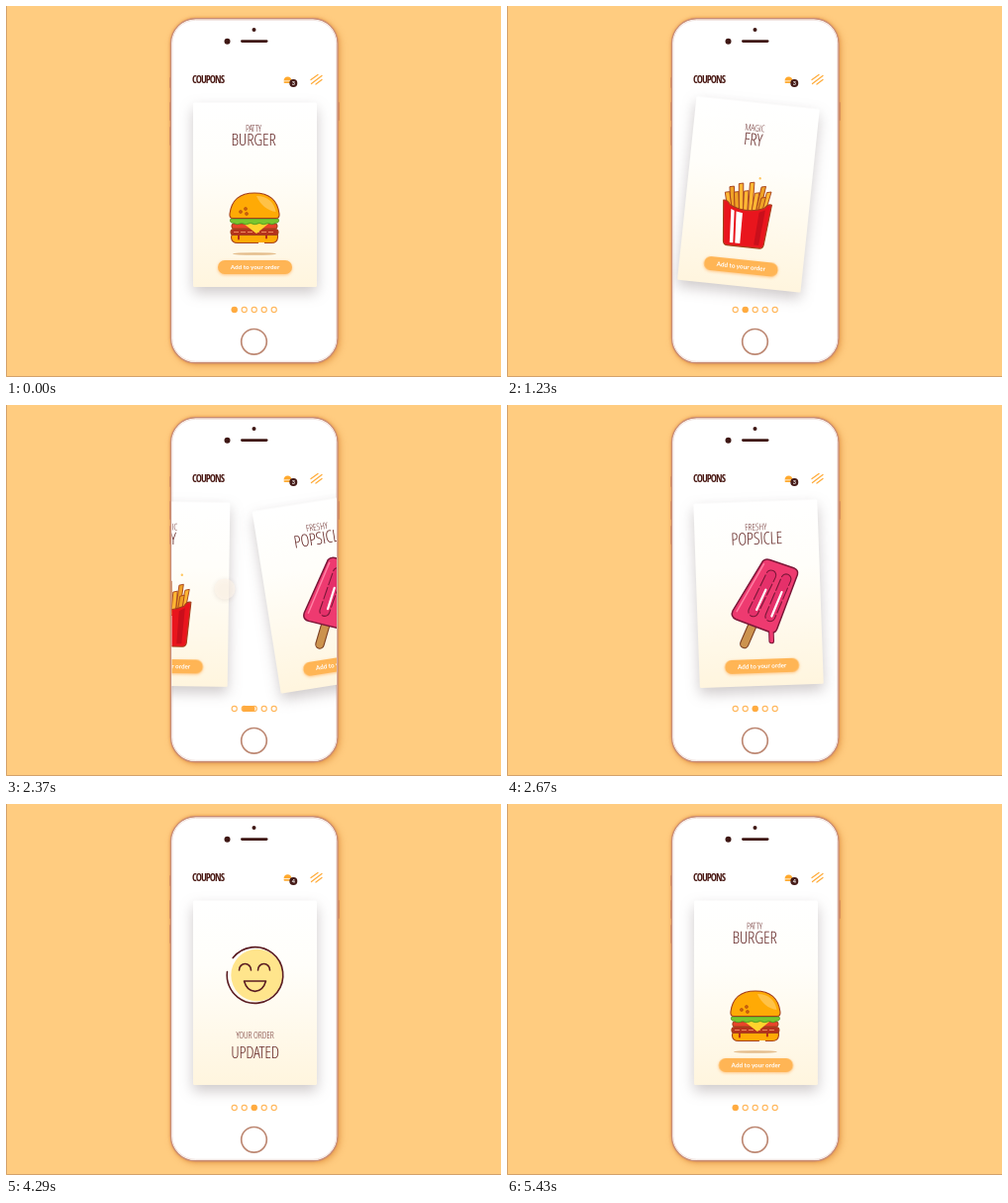
An HTML page for the animation above (5460 ms loop, 500 px wide and 375 px high).

```html
<!DOCTYPE html>
<html lang="en">
<head>
<meta charset="utf-8">
<title>Coupons</title>
<style>
  html, body { margin: 0; width: 100%; height: 100%; overflow: hidden; background: #ffcc80; }
  svg { display: block; width: 500px; height: 375px; }
  text { text-anchor: middle; font-family: "Open Sans Condensed Light", "Roboto Condensed", "Open Sans Condensed", "Liberation Sans Narrow", sans-serif; font-stretch: condensed; }
  .kicker { font-size: 9.4px; font-weight: 300; letter-spacing: -.1px; fill: #6d3030; }
  .name { font-size: 17.2px; font-weight: 300; letter-spacing: -.2px; fill: #652827; }
  .head { font: 700 10.4px "Open Sans Condensed", "Roboto Condensed", sans-serif; letter-spacing: -.95px; fill: #4a1914; text-anchor: start; }
  .label { font: 700 6.3px Lato, sans-serif; fill: #fff; }
  .count { font: 700 5.5px Lato, sans-serif; fill: #fff; }
  .phone { filter: drop-shadow(0 0 1.5px rgba(215, 120, 50, .6)) drop-shadow(2px 2px 3px rgba(205, 115, 30, .4)); }
  .paper { filter: drop-shadow(0 6px 7px rgba(80, 60, 65, .28)); }
  .pill { filter: drop-shadow(0 1.5px 1.5px rgba(255, 150, 40, .5)); }
  .touch { filter: drop-shadow(0 1px 2px rgba(130, 90, 70, .25)); }
  .ink { stroke: #a5401a; stroke-width: 1.1; stroke-linejoin: round; stroke-linecap: round; }
  .line { fill: none; stroke: #5b1d22; stroke-width: 1.6; stroke-linecap: round; stroke-linejoin: round; }
</style>
</head>
<body>
<svg viewBox="0 0 500 375">
  <defs>
    <linearGradient id="cream" x1="0" y1="0" x2="0" y2="1">
      <stop offset="0" stop-color="#fff"/>
      <stop offset=".35" stop-color="#fffefa"/>
      <stop offset="1" stop-color="#fff5de"/>
    </linearGradient>
    <clipPath id="screen"><rect x="167.500" y="60" width="166.500" height="260"/></clipPath>
    <g id="paper"><rect class="paper" x="189" y="97.500" width="125" height="186.500" rx="1.500" fill="url(#cream)"/></g>
    <g id="button">
      <rect class="pill" x="-37.500" y="-7" width="75" height="14" rx="7" fill="#ffb555"/>
      <text class="label" y="2.200">Add to your order</text>
    </g>
  </defs>

  <rect width="500" height="375" fill="#ffcc80"/>
  <path d="M.5 0V374.500H500" fill="none" stroke="#d3a26c"/>

  <g fill="#dda27c">
    <rect x="165" y="72" width="2" height="11" rx="1"/>
    <rect x="165" y="97" width="2" height="19" rx="1"/>
    <rect x="165" y="122" width="2" height="19" rx="1"/>
    <rect x="335" y="97" width="2" height="19" rx="1"/>
  </g>
  <rect class="phone" x="166.500" y="12.800" width="168.500" height="348" rx="25" fill="#fff" stroke="#c98d76" stroke-width="1.400"/>
  <rect x="168" y="14.300" width="165.500" height="345" rx="23.500" fill="none" stroke="#f1e3df"/>
  <g fill="#3f1815">
    <circle cx="250.500" cy="24" r="2"/>
    <circle cx="223.500" cy="35.700" r="3"/>
    <rect x="237" y="34.200" width="27.500" height="2.800" rx="1.400"/>
  </g>
  <circle cx="250.500" cy="339.300" r="12.800" fill="#fff" stroke="#bd8873" stroke-width="1.700"/>

  <text class="head" x="188" y="78">COUPONS</text>
  <g id="bag" fill="#ffa92e">
    <path d="M280.500 75.500Q281 71.500 284.500 71.500T288.500 75.500Z"/>
    <rect x="280.500" y="76.300" width="8" height="1.600" rx=".8"/>
  </g>
  <circle cx="290.300" cy="78" r="4" fill="#451b18"/>
  <text class="count" id="count" x="290.300" y="80"></text>
  <path d="M308 74.500L315 69.500M308.500 78.500L319 70.500M313 79L319 74.500" fill="none" stroke="#ffad3d" stroke-width="1.300" stroke-linecap="round"/>

  <g clip-path="url(#screen)">
    <g id="burger">
      <use href="#paper"/>
      <text class="kicker" x="250" y="126.500">PATTY</text>
      <text class="name" x="250" y="141">BURGER</text>
      <ellipse id="shade" cx="251" cy="250.500" rx="22" ry="1.300" fill="#e4bd8c"/>
      <g id="bun">
        <path class="ink" d="M228 231.500H274.500V234Q274 239.500 268 239.500H234Q228 239.500 227.500 234Z" fill="#ffaa05"/>
        <rect class="ink" x="228" y="220" width="46" height="5" rx="2.500" fill="#e8452a"/>
        <rect class="ink" x="227" y="225.500" width="48" height="6" rx="3" fill="#b5321d"/>
        <path d="M230 228.500H272" stroke="#f08a5c" stroke-dasharray="5 2"/>
        <path d="M238 218.500H267L253 230Z" fill="#ffd42d"/>
        <path d="M227 215H275Q277 219 272 219.500Q269 222 265 219.500Q260 222 256 219.500Q251 222 247 219.500Q242 222 238 219.500Q233 222 230 219.500Q225 219 227 215Z" fill="#79c62f" stroke="#3f8a1b" stroke-width=".7"/>
        <path class="ink" d="M229 214.500Q225.500 214.500 226 210C228 195 238 189 251 189S274 195 276 210Q276.500 214.500 273 214.500Z" fill="#ffaa05"/>
        <path d="M253 192C265 192 271 199 272.500 208C264 207 257 201 253 192Z" fill="#ffc247"/>
        <g fill="none" stroke="#a83a10" stroke-width="1.100"><circle cx="237" cy="208" r="1.200"/><circle cx="242" cy="205" r="1.200"/><circle cx="243" cy="210" r="1.200"/></g>
        <path d="M235 232V235.500M263 232V234.500" stroke="#b52c1b" stroke-width="2" stroke-linecap="round"/>
        <path d="M255 239.800H261" stroke="#fff4da" stroke-width="1.800"/>
      </g>
      <use href="#button" transform="translate(251.500 264)"/>
    </g>

    <g id="fries">
      <use href="#paper"/>
      <text class="kicker" x="251" y="126.500">MAGIC</text>
      <text class="name" x="250.500" y="141">FRY</text>
      <g id="sticks" class="ink" fill="#ffb734"></g>
      <path class="ink" d="M227 199Q231 198 234 203Q251 211 269 203Q272 198 276 199L272 240Q271.500 244 268 244H235Q231.500 244 231 240Z" fill="#e9151d"/>
      <path d="M235.500 207L239 208.500L241 241H237.500ZM241 209L247.500 210L248 241H243Z" fill="#fff"/>
      <path d="M264 208L270 205L267 241H262Z" fill="#c90f1b"/>
      <circle id="spark" cx="266.500" cy="171.500" r="1.200" fill="#ffc65e"/>
      <use href="#button" transform="translate(251.500 264)"/>
    </g>

    <g id="sweet">
      <use href="#paper"/>
      <g id="pop">
        <text class="kicker" x="251" y="126.500">FRESHY</text>
        <text class="name" x="251.500" y="141">POPSICLE</text>
        <path d="M244.500 222L235.500 241" stroke="#7b4024" stroke-width="9.500" stroke-linecap="round"/>
        <path d="M244.500 222L235.500 241" stroke="#cc934e" stroke-width="7.300" stroke-linecap="round"/>
        <path d="M263 226V239" stroke="#7b1738" stroke-width="5.600" stroke-linecap="round"/>
        <path d="M257 158Q260 155.500 264 157L288 166Q293 168.500 291.500 173L269 227Q267 232 261.500 230L228 216Q222 213 225 207Z" fill="#ee3a70" stroke="#7b1738" stroke-width="1.500" stroke-linejoin="round"/>
        <path d="M263 226V239" stroke="#ee3a70" stroke-width="3.600" stroke-linecap="round"/>
        <path d="M258 161L229 208" stroke="#ff7fa3" stroke-width="1.500" stroke-linecap="round"/>
        <g fill="#e5306a" stroke="#7b1738" stroke-width="1.100" stroke-dasharray="13 2">
          <rect x="-5" y="-26" width="10" height="51" rx="5" transform="translate(255 191) rotate(28)"/>
          <rect x="-5" y="-26" width="10" height="51" rx="5" transform="translate(271 196) rotate(25)"/>
        </g>
        <path d="M259 187L249 207M275 190L264 214" stroke="#fff" stroke-width="2.200" stroke-linecap="round"/>
        <g id="press"><use href="#button"/></g>
      </g>
      <g id="done">
        <text class="kicker" x="251.500" y="237">YOUR ORDER</text>
        <text class="name" x="251.500" y="256.500">UPDATED</text>
        <g id="face">
          <circle cx="2" r="26.200" fill="#ffe58c"/>
          <circle id="ring" class="line" r="28.300" pathLength="100" transform="rotate(-142)"/>
          <path class="line" d="M-16 -5A6 6.500 0 0 1 -4 -5M3 -5A6 6.500 0 0 1 15 -5"/>
          <path id="mouth" class="line" d="M-11 6H11Q8 15.500 0 15.500T-11 6Z"/>
        </g>
      </g>
    </g>
  </g>

  <g id="dots" fill="none" stroke="#ffb75c" stroke-width="1.100"></g>
  <rect id="active" y="304" height="6" rx="3" fill="#ffab40"/>
  <circle id="touch" class="touch" r="10.500" fill="#fdf2e6" fill-opacity=".8"/>
</svg>

<script>
const LOOP = 5460;
const $ = id => document.getElementById(id);
const set = (id, attr, value) => $(id).setAttribute(attr, value);
const ramp = (t, a, b) => Math.min(1, Math.max(0, (t - a) / (b - a)));
const smooth = p => p * p * (3 - 2 * p);
const out = p => 1 - (1 - p) ** 2;

// Eased value through [time, value] steps
function key(t, steps) {
  let [t0, v0] = steps[0];
  for (const [t1, v1] of steps) {
    if (t < t1) return v0 + (v1 - v0) * smooth(ramp(t, t0, t1));
    [t0, v0] = [t1, v1];
  }
  return v0;
}

// Each swipe: dir of travel, pace of its own clock, dots it joins
const swipes = [
  { start: 560, pace: 1.3, dir: -1, from: "burger", to: "fries", dots: [0, 1] },
  { start: 2010, pace: 1, dir: -1, from: "fries", to: "sweet", dots: [1, 2] },
  { start: 4730, pace: .85, dir: 1, from: "sweet", to: "burger", dots: [2, 0] }
];
const SWING = [[120, 0], [300, 11], [360, 9], [500, -6.2], [660, 2], [840, 0]];
const LEAN = [[320, 0], [460, 4]];
const travel = u => u < 330 ? 43 * ramp(u, 130, 330) ** 2 : 43 + 107 * out(ramp(u, 330, 460));
const dotX = i => 230.7 + 10 * i;

function place(id, x, angle) {
  set(id, "display", Math.abs(x) < 150 ? "inline" : "none");
  set(id, "transform", `translate(${x} 0) rotate(${angle} 251 118)`);
}

function touch(x, y, alpha) {
  set("touch", "transform", `translate(${x} ${y})`);
  set("touch", "opacity", alpha);
}

function drawSwipe(t) {
  const s = swipes.filter(w => t >= w.start).pop();
  for (const id of ["burger", "fries", "sweet"]) place(id, 150, 0);
  touch(0, 0, 0);
  let lead = dotX(0), trail = lead;
  if (s) {
    const u = (t - s.start) / s.pace, x = travel(u);
    place(s.from, s.dir * x, -s.dir * key(u, LEAN));
    place(s.to, s.dir * (x - 150), s.dir * key(u, SWING));
    touch((s.dir < 0 ? 296 : 210) + s.dir * Math.min(x, 75), s.dir < 0 ? 186 : 164,
      key(u, [[0, 0], [60, 1], [340, 1], [400, 0]]));
    const [a, b] = s.dots.map(dotX);
    lead = a + (b - a) * smooth(ramp(u, 250, 410));
    trail = a + (b - a) * smooth(ramp(u, 330, 520));
  } else {
    place("burger", 0, 0);
  }
  set("active", "x", Math.min(lead, trail) - 3);
  set("active", "width", Math.abs(lead - trail) + 6);
}

function drawOrder(t) {
  if (t > 2860 && t < 3400) touch(275, 264, key(t, [[2880, 0], [2990, 1], [3220, 1], [3360, 0]]));
  const push = key(t, [[2980, 1], [3080, .95], [3220, 1]]);
  set("press", "transform", `translate(252.500 264) scale(${push})`);

  set("pop", "opacity", 1 - smooth(ramp(t, 3800, 3930)));
  set("done", "opacity", smooth(ramp(t, 3890, 4020)));
  const grow = key(t, [[3890, .3], [4100, 1.06], [4200, 1]]);
  set("face", "transform", `translate(251.500 173) scale(${grow})`);
  set("ring", "stroke-dasharray", `${95 * smooth(ramp(t, 3920, 4340))} 100`);
  set("mouth", "transform", `translate(0 6) scale(1 ${key(t, [[4020, .2], [4260, 1.1], [4370, 1]])}) translate(0 -6)`);

  const hop = key(t, [[3600, 0], [3780, -2], [3960, .8], [4140, -.8], [4360, 0]]);
  set("bag", "transform", `translate(0 ${hop}) rotate(${-hop * 4} 284 75)`);
  $("count").textContent = t < 3840 ? "3" : "4";
}

function drawFood(t) {
  const bob = Math.sin(Math.PI * ramp(t, 30, 560)) * 2;
  set("bun", "transform", `translate(0 ${-bob})`);
  set("shade", "rx", 22 - bob);
  const drift = smooth(ramp(t, 1200, 1900)) - 1;
  set("spark", "transform", `translate(${5 * drift} ${-2 * drift})`);
}

function build() {
  // x at base, x at tip, y of tip
  const sticks = [[238, 234, 184], [246, 243, 180], [255, 254, 178], [262, 266, 181], [267, 272, 186],
    [235, 230, 190], [242, 239, 189], [250, 249, 187], [258, 260, 188], [264, 267, 192]];
  $("sticks").innerHTML = sticks.map(([x, tip, y], i) =>
    `<path d="M${x - 2} 212L${tip - 2.2} ${y + 1}L${tip + 2.2} ${y}L${x + 2.4} 212Z" fill="${i % 3 ? "#ffb734" : "#efa126"}" stroke-width=".9"/>`).join("");
  $("dots").innerHTML = [0, 1, 2, 3, 4].map(i => `<circle cx="${dotX(i)}" cy="307" r="2.600"/>`).join("");
}

const begin = performance.now();
function frame() {
  const t = (performance.now() - begin) % LOOP;
  drawSwipe(t);
  drawOrder(t);
  drawFood(t);
  requestAnimationFrame(frame);
}

build();
frame();
</script>
</body>
</html>
```
